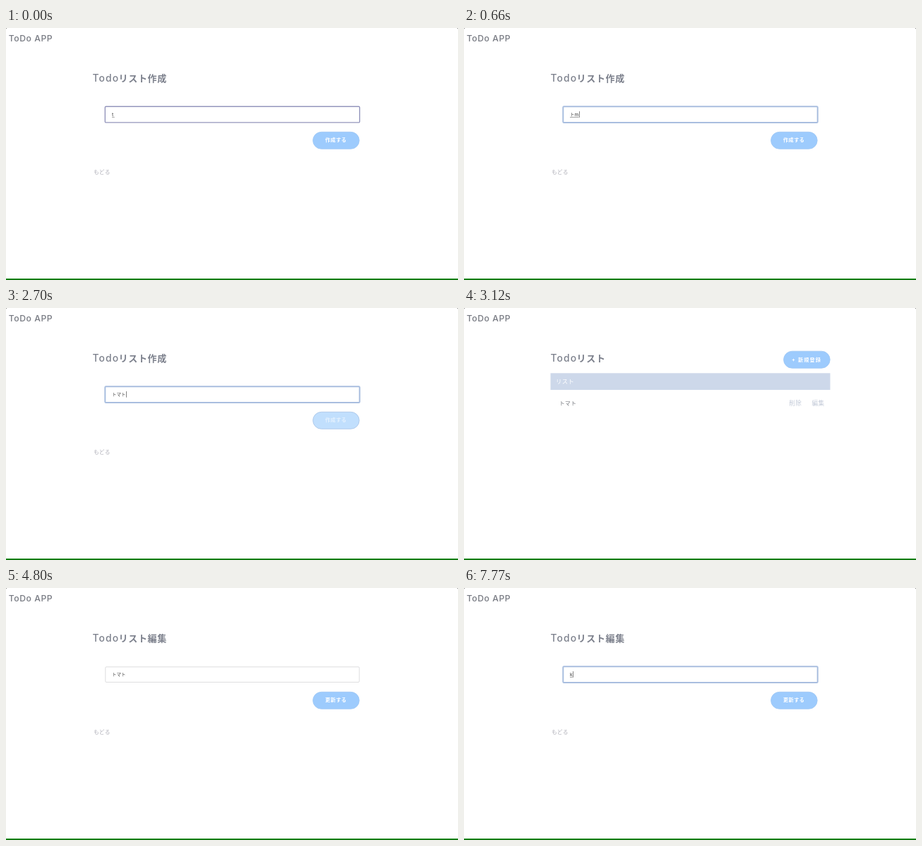
An HTML page that plays this animation: 640x357 px, repeating every 8000 ms.

```html
<!DOCTYPE html>
<html lang="ja">
<head>
<meta charset="utf-8">
<title>ToDo APP</title>
<style>
  html, body { margin: 0; width: 100%; height: 100%; overflow: hidden; background: #fff; }
  svg { display: block; width: 100vw; height: 100vh; }
  text { font-family: Inter, "Noto Sans CJK JP", "Noto Sans CJK", sans-serif; white-space: pre; }
  .brand { font-size: 12.2px; font-weight: 500; letter-spacing: .55px; fill: #777a82; }
  .title { font-size: 13px; font-weight: 600; letter-spacing: .7px; fill: #7c808c; }
  .title.latin { font-size: 13.8px; font-weight: 500; letter-spacing: 1.1px; }
  .button rect { fill: #9dcbfd; stroke: #9ec7f4; stroke-width: .8; }
  .button text { font-size: 7.2px; font-weight: 700; letter-spacing: .4px; fill: #fff; }
  .button.pale rect { fill: #c1dffd; stroke: #a7c3e6; }
  .button.pale text { fill: #e4f1fe; }
  .back { font-size: 7.8px; font-weight: 500; letter-spacing: .2px; fill: #b2b2ba; }
  .field { font-size: 6.5px; font-weight: 500; fill: #505050; }
  .cell { font-size: 7.7px; font-weight: 500; letter-spacing: .4px; fill: #74777d; }
  .head { font-size: 8.3px; font-weight: 500; letter-spacing: .4px; fill: #fff; }
  .link { font-size: 8.6px; letter-spacing: .4px; fill: #c3cad8; }
  .menu text { font-size: 7.5px; fill: #777; }
  .menu .hint { font-size: 6px; fill: #aaa; }
</style>
</head>
<body>
<svg viewBox="0 0 640 357" preserveAspectRatio="none">
  <rect width="640" height="357" fill="#fff"/>
  <path d="M0 0h1.5L0 1.5zM640 0h-1.5L640 1.5z" fill="#888"/>
  <text class="brand" x="3.7" y="18.5">ToDo APP</text>
  <text class="title latin" x="122.6" y="76.2">Todo</text>
  <text class="title" x="159.5" y="76.2" id="title"></text>

  <g id="form">
    <rect id="box" fill="#fff"/>
    <rect id="selection" x="150" y="117" width="20.5" height="10" fill="#c9dffb"/>
    <text class="field" x="150" y="125" id="value"></text>
    <path id="underline" stroke="#777" stroke-width=".7"/>
    <path id="caret" stroke="#666" stroke-width=".8"/>
    <g class="button" id="submit">
      <rect x="434.6" y="147.3" width="65.6" height="24" rx="12"/>
      <text x="452" y="161.2" id="label"></text>
    </g>
    <text class="back" x="124" y="207">もどる</text>
  </g>

  <g id="list">
    <g class="button">
      <rect x="452.6" y="61.2" width="65.6" height="24" rx="12"/>
      <text x="464" y="75.8">+</text>
      <text x="473" y="75.8" style="letter-spacing:1.1px">新規登録</text>
    </g>
    <rect x="122.5" y="92.3" width="396" height="23.7" fill="#cdd8ea"/>
    <text class="head" x="130" y="107.2">リスト</text>
    <text class="cell" x="135" y="138">トマト</text>
    <text class="link" x="460.3" y="138.3">削除</text>
    <text class="link" x="492.5" y="138.3">編集</text>
  </g>

  <g class="menu" id="menu">
    <rect x="143.5" y="128.5" width="126" height="90" rx="2" fill="#fcfcfc" stroke="#ddd"/>
  </g>

  <rect y="355" width="640" height="2" fill="#007c00"/>
</svg>
<script>
const LOOP = 8000;
const $ = id => document.getElementById(id);

// Each entry holds from its time on; typed text is underlined until confirmed.
const typing = [
  { at: 0, text: "t", caret: 154.5, open: true },
  { at: 300, text: "ト", caret: 157.5, open: true },
  { at: 540, text: "トm", caret: 163.5, open: true },
  { at: 720, text: "トマ", caret: 163.7, open: true },
  { at: 960, text: "トマt", caret: 166.5, open: true },
  { at: 1140, text: "トマト", caret: 170.5, open: true },
  { at: 1800, text: "トマト", caret: 170.5 },
  { at: 7050, text: "", caret: 150.5 },
  { at: 7770, text: "k", caret: 154.5, open: true }
];
const caretOff = [[0, 300], [1620, 1800], [2280, 2700], [4500, 5430], [6030, 7050], [7530, 7770]];

const boxStyles = {
  settling: { inset: 0, stroke: "#9496bc", "stroke-width": 1.4 },
  focused: { inset: 0, stroke: "#a9bedf", "stroke-width": 2 },
  idle: { inset: .5, stroke: "#dddddf", "stroke-width": 1 }
};

const within = (t, from, to) => t >= from && t < to;
const show = (id, on) => $(id).setAttribute("display", on ? "inline" : "none");
const set = (id, attrs) => {
  for (const key in attrs) $(id).setAttribute(key, attrs[key]);
};

function addCandidates() {
  ["トマト", "トマトソース", "トマトスープ", "トマト缶", "とまと", "Tabキーで選択"].forEach((word, i) => {
    const row = document.createElementNS("http://www.w3.org/2000/svg", "text");
    row.setAttribute("x", 150);
    row.setAttribute("y", 139 + i * 14.8);
    if (i === 5) row.setAttribute("class", "hint");
    row.textContent = word;
    $("menu").append(row);
  });
}

function drawBox(state) {
  const { inset, ...line } = boxStyles[state];
  set("box", {
    x: 140.3 + inset, y: 111.3 + inset,
    width: 360.4 - 2 * inset, height: 22.6 - 2 * inset,
    rx: 1.2, ...line
  });
}

function draw(t) {
  const listing = within(t, 3000, 4500);
  const editing = t >= 4500;
  const entry = typing.findLast(e => t >= e.at);

  $("title").textContent = listing ? "リスト" : editing ? "リスト編集" : "リスト作成";
  $("label").textContent = editing ? "更新する" : "作成する";
  $("value").textContent = entry.text;
  show("form", !listing);
  show("list", listing);
  show("menu", within(t, 1350, 1800));
  show("selection", within(t, 6480, 7050));
  show("underline", entry.open);
  show("caret", !caretOff.some(([from, to]) => within(t, from, to)));
  $("submit").classList.toggle("pale", within(t, 2700, 3000));

  drawBox(t < 30 ? "settling" : within(t, 4500, 5430) ? "idle" : "focused");
  set("underline", { d: `M150 126.4H${entry.caret - .8}` });
  set("caret", { d: `M${entry.caret} 118V126.7` });
}

function tick() {
  draw(performance.now() % LOOP);
  requestAnimationFrame(tick);
}

addCandidates();
tick();
</script>
</body>
</html>
```
